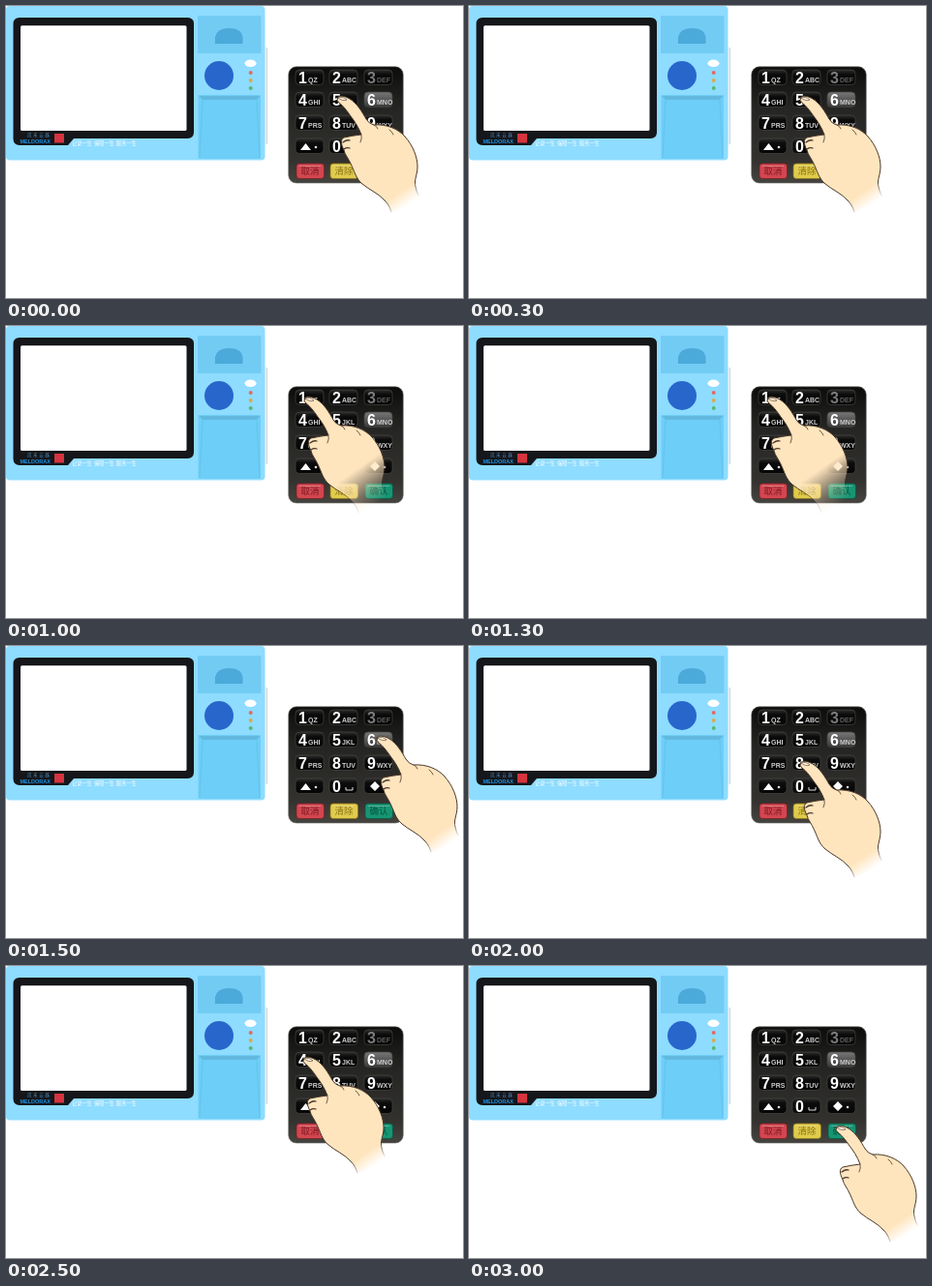
Write an HTML page that moves like this. It is 472 by 302 pixels and loops after 3500 ms.

```html
<!DOCTYPE html>
<html lang="zh">
<head>
<meta charset="utf-8">
<title>Keypad entry</title>
<style>
  html, body { margin: 0; width: 100%; height: 100%; overflow: hidden; background: #fff; }
  svg { display: block; width: 472px; height: 302px; }
  text { font-family: "Liberation Sans", sans-serif; }
  .cjk { font-family: "Noto Sans CJK SC", "Noto Sans CJK", sans-serif; }
  .digit { font-size: 16px; font-weight: 700; fill: #fff; }
  .letters { font-size: 7px; font-weight: 700; fill: #ccc; }
  .word { font-size: 9.5px; font-weight: 500; text-anchor: middle; }

  #hand { animation: press 3.5s step-end infinite; }
  #wrist { animation: fade 3.5s step-end infinite; }

  @keyframes press {
    0%       { transform: translate(341px, 92px); }
    14.2857% { transform: translate(341px, 143px); }
    28.5714% { transform: translate(307px, 72px); }
    42.8571% { transform: translate(382px, 92px); }
    57.1429% { transform: translate(341px, 118px); }
    71.4286% { transform: translate(306px, 93px); }
    85.7143%, 100% { transform: translate(378px, 164px); }
  }
  @keyframes fade {
    0%, 42.8571%, 100% { stop-opacity: 1; }
    28.5714% { stop-opacity: .3; }
  }
</style>
</head>
<body>
<svg viewBox="0 0 472 302" xmlns="http://www.w3.org/2000/svg">
  <defs>
    <linearGradient id="pad" x2="0" y2="1">
      <stop stop-color="#0c0c0b"/><stop offset=".35" stop-color="#252523"/>
      <stop offset=".8" stop-color="#32312e"/><stop offset="1" stop-color="#45443f"/>
    </linearGradient>
    <linearGradient id="cap" x2="0" y2="1">
      <stop stop-color="#2e2e2d"/><stop offset=".3" stop-color="#0c0c0c"/><stop offset="1" stop-color="#050505"/>
    </linearGradient>
    <linearGradient id="capLight" x2="0" y2="1">
      <stop stop-color="#777"/><stop offset="1" stop-color="#393939"/>
    </linearGradient>
    <linearGradient id="fade" gradientUnits="userSpaceOnUse" x1="50" y1="80" x2="74" y2="114">
      <stop stop-color="#fff"/>
      <stop id="wrist" offset=".62" stop-color="#fff"/>
      <stop offset="1" stop-color="#fff" stop-opacity="0"/>
    </linearGradient>
    <mask id="sleeve" maskUnits="userSpaceOnUse" x="-4" y="-4" width="100" height="135">
      <rect x="-4" y="-4" width="100" height="135" fill="url(#fade)"/>
    </mask>
  </defs>

  <!-- terminal -->
  <path d="M267 43h2.500v100H267z" fill="#edf3f6"/>
  <path d="M269.500 43V143" stroke="#c3ced4" stroke-width=".8"/>
  <rect width="267.500" height="159.500" rx="4" fill="#8edcff"/>
  <path d="M14 12H187.500Q194 12 194 18.500V130.500Q194 137 187.500 137H70L64 144H14Q7.500 144 7.500 137.500V18.500Q7.500 12 14 12Z" fill="#15171a"/>
  <rect x="15" y="20.200" width="171.500" height="108.800" rx="1.500" fill="#fff"/>

  <rect x="198" y="10" width="65.500" height="39" rx="1" fill="#72cbf3"/>
  <path d="M216 39V32Q218 23 230.500 23T244.500 32V39Z" fill="#4baad9"/>
  <circle cx="220" cy="72" r="15" fill="#2866cc"/>
  <ellipse cx="252.500" cy="59.300" rx="6" ry="3.700" fill="#fff"/>
  <circle cx="252.700" cy="69" r="2" fill="#e46a62"/>
  <circle cx="252.700" cy="77" r="2" fill="#d9a94e"/>
  <circle cx="252.700" cy="85" r="2" fill="#57b96d"/>
  <rect x="198.500" y="92" width="64.500" height="66" rx="1" fill="#6dcef8"/>
  <path d="M199 93H262.500L259 97H203Z" fill="#62b9e0"/>
  <path d="M203 97L200 157M259 97L262 157" stroke="#62bfe8" stroke-width=".8"/>

  <text class="cjk" x="22" y="135" font-size="4.500" letter-spacing="1.600" fill="#4a86b8">岚禾云器</text>
  <text x="14.500" y="141.500" font-size="5.500" font-weight="700" fill="#1c95ee">MELDORAX</text>
  <rect x="50" y="132" width="10" height="9.500" fill="#d5353f"/>
  <g font-size="5.200" font-weight="500" fill="#fff">
    <text class="cjk" x="68" y="144">记录一生</text>
    <text class="cjk" x="91" y="144">保障一生</text>
    <text class="cjk" x="114" y="144">服务一生</text>
  </g>

  <!-- keypad -->
  <rect x="291.800" y="62.800" width="118.400" height="120.200" rx="8" fill="url(#pad)" stroke="#5a5a57" stroke-width=".6"/>
  <g id="keys"></g>

  <!-- hand -->
  <g id="hand">
    <g mask="url(#sleeve)" stroke="#49372a" stroke-linecap="round" stroke-linejoin="round" fill="none">
      <path fill="#ffe5be" stroke="none" d="M1.500 3C3 0 9 1 14 4C22 9 27 18 31 25Q34 30 39 31C52 30 64 35 71 43C79 52 84 64 84 74C84 83 80 88 82 95C83 101 86 105 88 110L57 121C55 115 53 112 50 109C44 102 34 98 27 92C20 86 19 79 15 71C13 66 9 62 8 57C5 51 4 46 8 44Q17 42 26 41C23 33 19 27 15 22C11 16 7 11 3 8Q0 6 1.500 3Z"/>
      <path d="M88 110C86 105 83 101 82 95C80 88 84 83 84 74C84 64 79 52 71 43C64 35 52 30 39 31Q34 30 31 25C27 18 22 9 14 4C9 1 3 0 1.500 3Q0 6 3 8C7 11 11 16 15 22C19 27 23 33 26 41Q17 42 8 44C4 46 5 51 8 57C9 62 13 66 15 71C19 79 20 86 27 92C34 98 44 102 50 109C53 112 55 115 57 121"/>
      <path d="M7 49Q11 46 14 47M8 56Q11 54 14 55" stroke-width="1.300"/>
      <path d="M26 41Q27 45 25 49M39 31Q42 32 43 35M55 36Q58 38 59 41" stroke-width=".8"/>
      <path d="M2 3Q7 1 11 5Q7 7 2 3Z" fill="#fff3e4" stroke-width=".6"/>
    </g>
  </g>
</svg>
<script>
  const cols = [313, 348, 384], rows = [74, 97, 121, 145];
  const labels = ["QZ", "ABC", "DEF", "GHI", "JKL", "MNO", "PRS", "TUV", "WXY"];
  const key = (x, y, fill) =>
    `<rect x="${x - 14}" y="${y - 8}" width="29" height="15.5" rx="4" fill="${fill}" stroke="#454542" stroke-width=".7"/>`;
  const digit = (n, x, y) => `<text class="digit" x="${x - 11}" y="${y + 6}">${n}</text>`;
  const dot = x => `<circle cx="${x}" cy="146" r="1.3" fill="#ddd"/>`;

  let art = labels.map((label, i) => {
    const x = cols[i % 3], y = rows[Math.floor(i / 3)];
    return key(x, y, i === 5 ? "url(#capLight)" : "url(#cap)") +
      `<g opacity="${i === 2 ? .45 : 1}">${digit(i + 1, x, y)}` +
      `<text class="letters" x="${x - 1}" y="${y + 5}">${label}</text></g>`;
  }).join("");

  art += cols.map(x => key(x, 145, "url(#cap)")).join("") + digit(0, cols[1], 145) +
    '<path d="M304 149L309.500 142L315 149ZM376 145L381 140L386 145L381 150Z" fill="#fff"/>' +
    '<path d="M351 146V149H358V146" fill="none" stroke="#ddd"/>' + dot(320) + dot(391);

  art += [["取消", "#d24650", "#7d1a22"], ["清除", "#e0cb4c", "#8b7417"], ["确认", "#179573", "#075541"]]
    .map(([word, fill, ink], i) => {
      const x = cols[i] + 1;
      return `<rect x="${x - 14}" y="163" width="28.5" height="15.5" rx="3" fill="${fill}" stroke="${ink}" stroke-width=".7"/>` +
        `<path d="M${x - 11} 165.500H${x + 11}" stroke="#fff" opacity=".3"/>` +
        `<text class="cjk word" x="${x}" y="174" fill="${ink}">${word}</text>`;
    }).join("");

  document.getElementById("keys").innerHTML = art;
</script>
</body>
</html>
```
